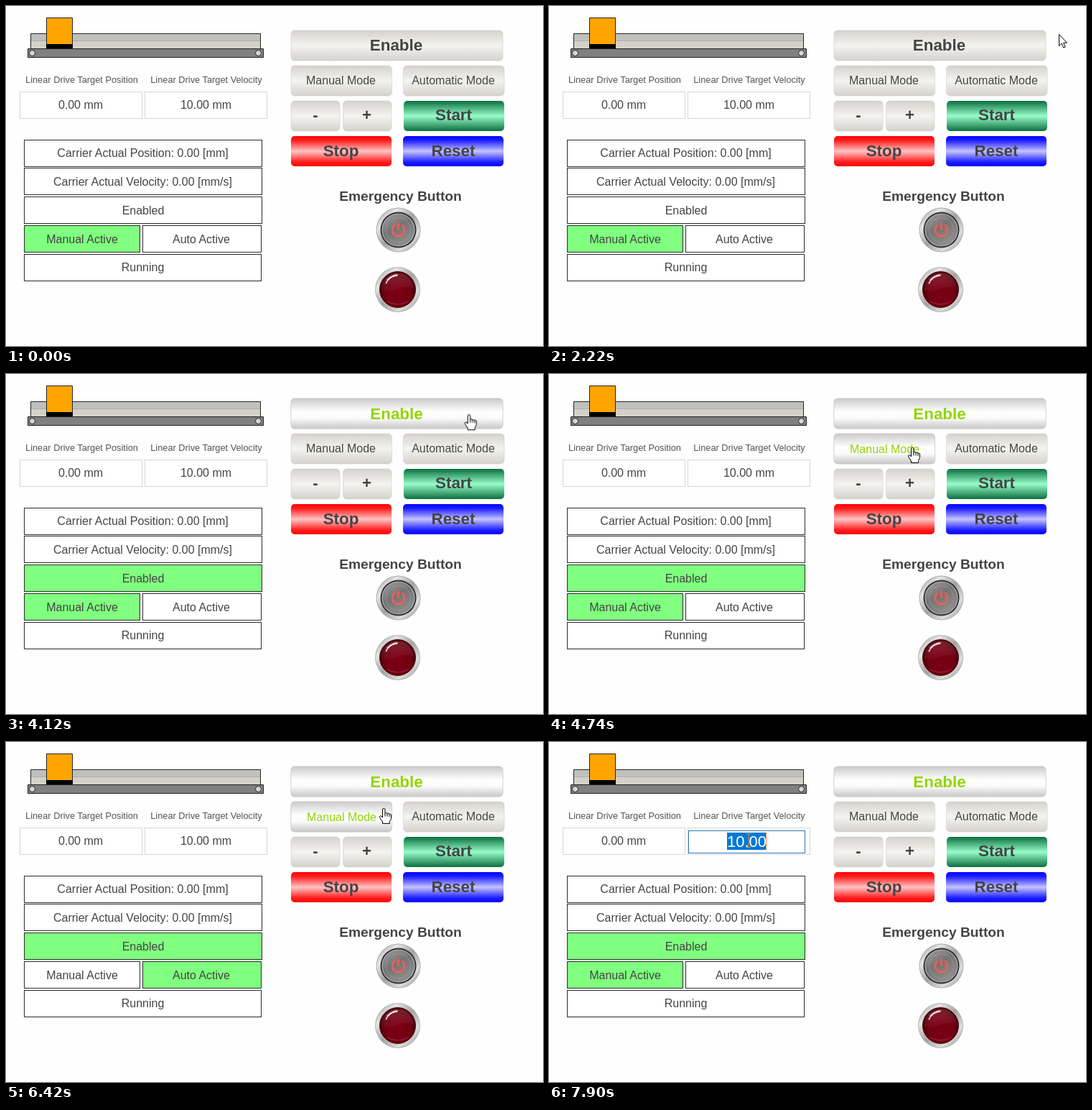
Animation, 748 px wide and 473 px high, one loop 7990 ms. Source, as an HTML page:

```html
<!DOCTYPE html>
<html lang="en">
<head>
<meta charset="utf-8">
<title>Linear drive panel</title>
<style>
html, body { margin: 0; width: 100%; height: 100%; overflow: hidden; background: #fefefe; }
svg { display: block; }
text { font: 16px "Liberation Sans", Arial, sans-serif; fill: #444; text-anchor: middle; }
.label { font-size: 12.8px; fill: #555; }
.big { font-size: 22.4px; font-weight: bold; }
.head { font-size: 19.2px; font-weight: bold; }
.row { fill: #fff; stroke: #2b2b2b; }
.field { fill: #fff; stroke: #d6d6d6; }
.lit .row { fill: #80ff80; }
.lit .btn { fill: url(#active); stroke: #c4c4c4; }
.btn { fill: url(#metal); stroke: #d2cfc9; stroke-width: .6; }
.pressed text { fill: #92d400; }

/* one loop is 7990 ms */
.anim { animation: 7990ms step-end infinite; }
#enable { animation-name: enable; }
#manual { animation-name: manual; }
#auto { animation-name: auto; }
#manualRow { animation-name: manualRow; }
#autoRow { animation-name: autoRow; }
#edit { animation-name: edit; }
#caret { animation-name: caret; }
#arrow { animation-name: arrow; }
#hand { animation-name: hand; }
#cursor { animation-name: move; }

@keyframes enable { 0% { opacity: 0; } 45.93%, 100% { opacity: 1; } }
@keyframes manual {
  0%, 62.07%, 82.47%, 100% { opacity: 0; }
  59.32%, 80.35% { opacity: 1; }
}
@keyframes auto { 0%, 73.59%, 100% { opacity: 0; } 71.21% { opacity: 1; } }
@keyframes manualRow { 0%, 83.1%, 100% { opacity: 1; } 71.71% { opacity: 0; } }
@keyframes autoRow { 0%, 83.1%, 100% { opacity: 0; } 71.71% { opacity: 1; } }
@keyframes edit { 0% { opacity: 0; } 97.74%, 100% { opacity: 1; } }
@keyframes caret { 0% { opacity: 0; } 98.24%, 100% { opacity: 1; } }
@keyframes arrow {
  0%, 11.26%, 34.54%, 100% { opacity: 0; }
  7.75%, 22.9% { opacity: 1; }
}
@keyframes hand {
  0%, 22.9%, 97.74%, 100% { opacity: 0; }
  11.26%, 34.54% { opacity: 1; }
}
/* the pointer is sampled about every 45 ms */
@keyframes move {
  0% { transform: translate(596px, 0); }
  7.75% { transform: translate(596px, 0); animation-timing-function: steps(6); }
  11.01% { transform: translate(650px, 60px); animation-timing-function: steps(6); }
  14.39% { transform: translate(694px, 170px); animation-timing-function: steps(3); }
  16.15% { transform: translate(697px, 255px); animation-timing-function: steps(2); }
  17.27% { transform: translate(684px, 286px); animation-timing-function: steps(3); }
  18.89% { transform: translate(660px, 271px); }
  25.59% { transform: translate(660px, 271px); animation-timing-function: steps(4); }
  27.78% { transform: translate(710px, 39px); }
  28.41% { transform: translate(711px, 31px); animation-timing-function: steps(3); }
  30.04% { transform: translate(692px, 34px); animation-timing-function: steps(5); }
  32.79% { transform: translate(661px, 55px); }
  41.93% { transform: translate(661px, 55px); animation-timing-function: steps(2); }
  43.17% { transform: translate(661px, 49px); }
  50.5% { transform: translate(661px, 49px); animation-timing-function: steps(9); }
  56.32% { transform: translate(514px, 114px); animation-timing-function: steps(5); }
  59.32% { transform: translate(506px, 102px); }
  66.15% { transform: translate(506px, 102px); animation-timing-function: steps(3); }
  67.7% { transform: translate(594px, 97px); }
  73.59% { transform: translate(594px, 97px); animation-timing-function: steps(3); }
  75.21% { transform: translate(526px, 92px); }
  88.73% { transform: translate(523px, 92px); animation-timing-function: steps(9); }
  93.62% { transform: translate(280px, 140px); }
  94.24%, 100% { transform: translate(277px, 133px); }
}
</style>
</head>
<body>
<svg width="748" height="473" viewBox="0 0 748 473">
  <defs>
    <linearGradient id="metal" x2="0" y2="1">
      <stop stop-color="#d5d2cc"/><stop offset=".5" stop-color="#f4f3f1"/><stop offset="1" stop-color="#d5d2cc"/>
    </linearGradient>
    <linearGradient id="active" x2="0" y2="1">
      <stop stop-color="#cbcbcb"/><stop offset=".45" stop-color="#fff"/><stop offset=".65" stop-color="#fbfbfb"/><stop offset="1" stop-color="#c8c8c8"/>
    </linearGradient>
    <linearGradient id="green" x2="0" y2="1">
      <stop stop-color="#0b6e3e"/><stop offset=".5" stop-color="#97fcca"/><stop offset="1" stop-color="#0b6e3e"/>
    </linearGradient>
    <linearGradient id="red" x2="0" y2="1">
      <stop stop-color="#f00"/><stop offset=".15" stop-color="#ff2020"/><stop offset=".5" stop-color="#ffc4c4"/><stop offset=".85" stop-color="#ff2020"/><stop offset="1" stop-color="#f00"/>
    </linearGradient>
    <linearGradient id="blue" x2="0" y2="1">
      <stop stop-color="#00f"/><stop offset=".15" stop-color="#2020ff"/><stop offset=".5" stop-color="#c4c4ff"/><stop offset=".85" stop-color="#2020ff"/><stop offset="1" stop-color="#00f"/>
    </linearGradient>
    <linearGradient id="rim" x2="1" y2="1">
      <stop stop-color="#8c8c8c"/><stop offset=".25" stop-color="#e6e6e6"/><stop offset=".5" stop-color="#a2a2a2"/><stop offset=".75" stop-color="#dedede"/><stop offset="1" stop-color="#858585"/>
    </linearGradient>
    <linearGradient id="dome" x2=".6" y2="1">
      <stop stop-color="#a0a0a0"/><stop offset=".5" stop-color="#747474"/><stop offset="1" stop-color="#8d8d8d"/>
    </linearGradient>
    <radialGradient id="lamp" cy=".6">
      <stop stop-color="#7c0016"/><stop offset=".7" stop-color="#720014"/><stop offset="1" stop-color="#4c000c"/>
    </radialGradient>
    <linearGradient id="gloss" x2="0" y2="1">
      <stop stop-color="#c06070" stop-opacity=".7"/><stop offset="1" stop-color="#a03045" stop-opacity=".25"/>
    </linearGradient>
  </defs>

  <!-- linear drive -->
  <g stroke="#222">
    <path d="M34.5 38.5H354.5V59.5H34.5Z" fill="#d4d1c8"/>
    <path d="M35 39H354V48.5H35Z" fill="#bfc0bd" stroke="none"/>
    <path d="M35 48.5H354" stroke="#aaa"/>
    <path d="M30.5 59.5H358.5V71.5H30.5Z" fill="#808080"/>
    <circle cx="36.5" cy="65.5" r="4" fill="#d6d6d6"/>
    <circle cx="351.5" cy="65.5" r="4" fill="#d6d6d6"/>
    <path d="M56.5 16.5H92.5V54H56.5Z" fill="#ffa500"/>
    <path d="M56 53H93V59H56Z" fill="#000" stroke="none"/>
  </g>

  <text class="label" x="105.5" y="107">Linear Drive Target Position</text>
  <text class="label" x="279" y="107">Linear Drive Target Velocity</text>
  <rect class="field" x="19.5" y="119.5" width="170" height="37"/>
  <rect class="field" x="193.5" y="119.5" width="170" height="37"/>
  <text x="104" y="143">0.00 mm</text>
  <text x="278.5" y="143">10.00 mm</text>

  <!-- status rows -->
  <rect class="row" x="25.5" y="186.5" width="331" height="37"/>
  <rect class="row" x="25.5" y="225.5" width="331" height="37"/>
  <rect class="row" x="25.5" y="265.5" width="331" height="37"/>
  <rect class="row" x="25.5" y="305.5" width="161" height="37"/>
  <rect class="row" x="190.5" y="305.5" width="165" height="37"/>
  <rect class="row" x="25.5" y="345.5" width="330" height="37"/>
  <g id="manualRow" class="anim lit"><rect class="row" x="25.5" y="305.5" width="161" height="37"/></g>
  <g id="autoRow" class="anim lit"><rect class="row" x="190.5" y="305.5" width="165" height="37"/></g>

  <!-- buttons -->
  <rect class="btn" x="397" y="34" width="295" height="42" rx="5"/>
  <rect class="btn" x="397" y="83" width="140.500" height="42" rx="5"/>
  <rect class="btn" x="553.5" y="83" width="140.500" height="42" rx="5"/>
  <rect class="btn" x="397" y="132" width="68" height="42" rx="5"/>
  <rect class="btn" x="469.5" y="132" width="67.500" height="42" rx="5"/>
  <rect x="554" y="132" width="140" height="42" rx="5" fill="url(#green)"/>
  <rect x="397" y="181" width="140" height="42" rx="5" fill="url(#red)"/>
  <rect x="553" y="181" width="140" height="42" rx="5" fill="url(#blue)"/>
  <text class="big" x="543.5" y="61.5">Enable</text>
  <text x="466.5" y="109">Manual Mode</text>
  <text x="623" y="109">Automatic Mode</text>
  <text class="big" x="431" y="159">-</text>
  <text class="big" x="502.500" y="159">+</text>
  <text class="big" x="623.5" y="159">Start</text>
  <text class="big" x="466.5" y="209">Stop</text>
  <text class="big" x="623" y="209">Reset</text>

  <g id="enable" class="anim lit pressed">
    <rect class="row" x="25.5" y="265.5" width="331" height="37"/>
    <rect class="btn" x="397" y="34" width="295" height="42" rx="5"/>
    <text class="big" x="544" y="62.500">Enable</text>
  </g>
  <g id="manual" class="anim lit pressed">
    <rect class="btn" x="397" y="83" width="140.500" height="42" rx="5"/>
    <text x="467.5" y="110">Manual Mode</text>
  </g>
  <g id="auto" class="anim lit pressed">
    <rect class="btn" x="553.5" y="83" width="140.500" height="42" rx="5"/>
    <text x="624" y="110">Automatic Mode</text>
  </g>

  <text x="190.5" y="210">Carrier Actual Position: 0.00 [mm]</text>
  <text x="190.5" y="249.500">Carrier Actual Velocity: 0.00 [mm/s]</text>
  <text x="191" y="289.500">Enabled</text>
  <text x="106" y="329.500">Manual Active</text>
  <text x="272" y="329.500">Auto Active</text>
  <text x="190.5" y="369">Running</text>

  <!-- emergency button and lamp -->
  <text class="head" x="549.5" y="270.5">Emergency Button</text>
  <g transform="translate(546.5 311.5)">
    <circle r="30.500" fill="url(#rim)" stroke="#9a9a9a" stroke-width=".8"/>
    <circle r="25" fill="#303030"/>
    <circle r="22.500" fill="url(#dome)" stroke="#b0b0b0" stroke-width="1.200"/>
    <circle r="17" fill="none" stroke="#999" stroke-width=".8"/>
    <g fill="none" stroke="#ff5a52" stroke-width="2.600" stroke-linecap="round">
      <path d="M-5.500 -6.500A8.500 8.500 0 1 0 5.500 -6.500M0 -9V-1"/>
    </g>
  </g>
  <g transform="translate(545.5 394.5)">
    <circle r="31" fill="url(#rim)" stroke="#a5a5a5" stroke-width=".8"/>
    <circle r="26" fill="#e2dcdc"/>
    <circle r="25" fill="url(#lamp)" stroke="#3a0509"/>
    <path d="M-23 1A23 23 0 0 1 23 -1Q12 -7 0 -1T-23 1Z" fill="url(#gloss)" opacity=".55"/>
    <path d="M-14 -13Q-9 -19 -1 -20" fill="none" stroke="#f3dede" stroke-width="2.400" stroke-linecap="round"/>
    <path d="M-16 -9L-15 -11" stroke="#e5bcc2" stroke-width="2" stroke-linecap="round"/>
    <path d="M-15 16Q0 25 15 16" fill="none" stroke="#a5223a" stroke-width="1.500" opacity=".7"/>
  </g>

  <!-- velocity editor -->
  <g id="edit" class="anim">
    <rect x="194.5" y="123.5" width="162" height="31" fill="#fff" stroke="#2a78b8"/>
    <rect x="248" y="126" width="55" height="24" fill="#0078d7"/>
    <text x="275.5" y="145.500" style="font-size:22px;fill:#fff">10.00</text>
    <path d="M275 127.500H281M278 128V146M275 146.500H281" fill="none" stroke="#e08a3c"/>
    <path id="caret" class="anim" d="M302.500 126V150" stroke="#ff8728"/>
  </g>

  <g id="cursor" class="anim" fill="#fff" stroke="#000" stroke-linejoin="round">
    <path id="arrow" class="anim" d="M.5 .5V16.500L4.200 13L6.700 19L9.200 18L6.700 12.200H11.500Z"/>
    <g id="hand" class="anim">
      <path d="M-1.500 13V2A1.750 1.600 0 0 1 2 2V7.500Q2 6.300 3.500 6.300T5 8.300Q5 7.200 6.500 7.200T8 9Q8 8 9.200 8T10.500 10V14.500L8.500 18.500V21.500H-1.500V19L-5 13.800Q-6.200 11.500 -4.700 10.700Q-3.300 10.200 -1.500 13Z"/>
      <path d="M2 7.500V11.500M5 8.300V11.500M8 9V12" fill="none"/>
    </g>
  </g>
</svg>
</body>
</html>
```
